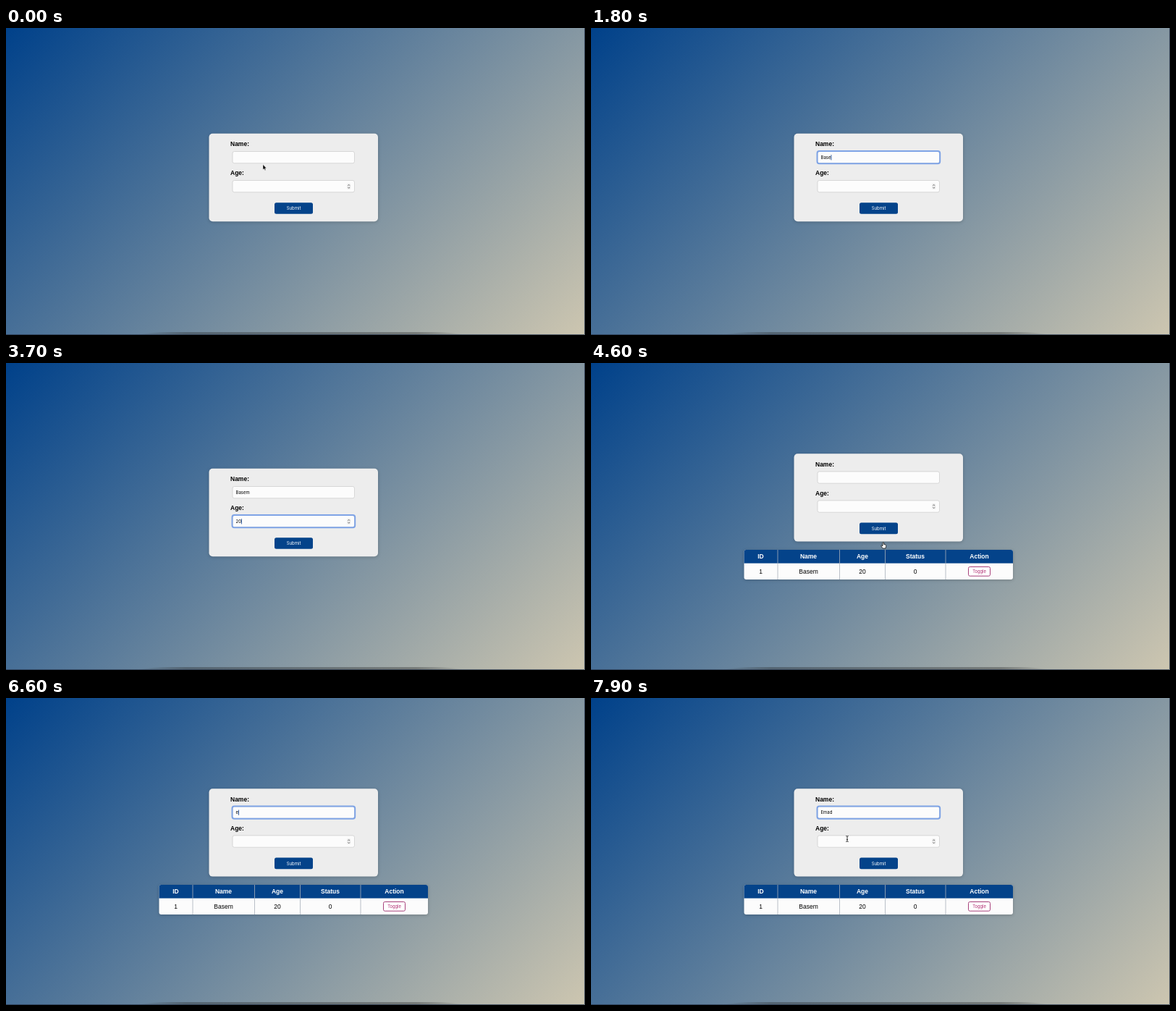
An HTML page that plays this animation: 800x424 px, repeating every 8000 ms.

```html
<!DOCTYPE html>
<html lang="en">
<head>
<meta charset="utf-8">
<title>Form and table</title>
<style>
html, body { margin: 0; width: 100%; height: 100%; overflow: hidden; }
body { background: linear-gradient(135deg, #00418a, #cdc6b0); }
svg { display: block; width: 800px; height: 424px; }
text { font: 8.5px "Liberation Sans", Arial, sans-serif; }
.bold { font-weight: bold; }
.ui { font: 6px Inter, sans-serif; }
.mid { text-anchor: middle; }
.field { fill: #fcfcfc; stroke: #cbcbcb; stroke-width: .7; }
.ring { fill: none; stroke: #7fa4e6; stroke-width: 2; }
.white { fill: #fff; }
#card, #table { filter: drop-shadow(0 1px 2px #0003); }
</style>
</head>
<body>
<svg viewBox="0 0 800 424">
  <defs>
    <linearGradient id="dock">
      <stop offset="0" stop-color="#222" stop-opacity="0"/>
      <stop offset=".15" stop-color="#222" stop-opacity=".35"/>
      <stop offset=".85" stop-color="#222" stop-opacity=".35"/>
      <stop offset="1" stop-color="#222" stop-opacity="0"/>
    </linearGradient>
    <clipPath id="round"><rect x="211.5" y="258" width="371.5" height="41" rx="3"/></clipPath>
  </defs>
  <path d="M180 424Q200 420 230 420H590Q615 420 635 424Z" fill="url(#dock)"/>
  <path d="M0 423.5H799.5V0" fill="none" stroke="#27364d" stroke-opacity=".75"/>

  <g id="form">
    <rect id="card" x="280.5" y="145.8" width="233.5" height="121.4" rx="5" fill="#ededed"/>
    <text class="bold" x="310" y="163.4">Name:</text>
    <text class="bold" x="310" y="203.4">Age:</text>
    <rect class="field" x="313" y="170.5" width="168.5" height="16.3" rx="2.5"/>
    <rect class="field" x="313" y="210.5" width="168.5" height="16.3" rx="2.5"/>
    <rect x="471.2" y="214.7" width="5" height="8" rx="1.5" fill="#ececec"/>
    <path d="M472.4 217.7l1.3-1.4 1.3 1.4M472.4 219.9l1.3 1.4 1.3-1.4" fill="none" stroke="#555" stroke-width=".8"/>
    <rect id="ring" class="ring" x="312.5" y="170" width="169.7" height="17.3" rx="3"/>
    <text id="name" class="ui" x="317.5" y="181.1"></text>
    <text id="age" class="ui" x="317.5" y="221.1"></text>
    <rect id="caret" width=".9" height="7.2" fill="#23519c"/>
    <rect id="submit" x="371" y="241.2" width="53" height="15.6" rx="2.5" fill="#04438a"/>
    <text class="ui mid white" x="397.5" y="251.4">Submit</text>
  </g>

  <g id="table">
    <g id="cells" clip-path="url(#round)">
      <rect x="211" y="258" width="373" height="41" fill="#fcfcfc"/>
      <rect x="211" y="258" width="373" height="18.6" fill="#04438a"/>
      <path d="M258 258v41M343.5 258v41M406.5 258v41M490 258v41" stroke="#a9b0ba" stroke-width=".8"/>
    </g>
    <rect x="521.5" y="281.5" width="30" height="12.7" rx="2" fill="#fff" stroke="#a8417c"/>
    <text class="ui mid" x="536.5" y="290" fill="#b02a70" style="font-size:5.8px">Toggle</text>
  </g>

  <g id="pointer">
    <path id="arrow" d="M0 0V7.3L1.7 5.8 2.8 8.3 4 7.8 2.9 5.3H5Z" fill="#000" stroke="#fff" stroke-width=".5"/>
    <path id="hand" d="M-1-4Q0-5 .7-4V-1.5L3-.9Q4-.5 3.8.7L3 4H-.8L-3.2.8Q-3.3-.4-2.2-.1L-1 .8Z" fill="#fff" stroke="#111" stroke-width=".8"/>
    <path id="beam" d="M-1.7-4Q0-4 0-3Q0-4 1.7-4M0-3V3M-1.7 4Q0 4 0 3Q0 4 1.7 4M-1 1H1" fill="none" stroke="#222" stroke-width=".9"/>
  </g>
</svg>
<script>
const $ = id => document.getElementById(id);
const LOOP = 8000, SUBMIT = 4500;

// Each step holds from its time until the next one.
const nameSteps = [[0, ""], [1200, "B"], [1400, "Ba"], [1600, "Bas"], [1800, "Base"], [1900, "Basem"],
  [SUBMIT, ""], [6500, "e"], [6800, ""], [7000, "E"], [7100, "Em"], [7200, "Ema"], [7300, "Emad"]];
const ageSteps = [[0, ""], [3300, "2"], [3500, "20"], [SUBMIT, ""]];
const focusSteps = [[0, ""], [700, "name"], [2700, "age"], [3900, ""], [5500, "name"]];
const shapeSteps = [[0, "arrow"], [300, "beam"], [1200, ""], [2100, "beam"], [3300, ""],
  [3900, "arrow"], [4200, "hand"], [4700, "arrow"], [5300, "beam"], [6500, ""], [7600, "beam"]];
const path = [[0, 355, 188.5], [100, 355, 188.5], [500, 347, 180], [2100, 347, 180], [2600, 345, 219],
  [3800, 345, 219], [4300, 404, 252], [4600, 404, 252], [5400, 347, 160.5], [7500, 347, 160.5], [7900, 354, 194.5]];

const at = (steps, t) => steps.findLast(s => s[0] <= t)[1];
const show = (id, on) => $(id).setAttribute("visibility", on ? "visible" : "hidden");
const move = (id, x, y) => $(id).setAttribute("transform", `translate(${x} ${y})`);

function pointerAt(t) {
  const i = path.findLastIndex(p => p[0] <= t);
  const a = path[i], b = path[i + 1] || a;
  const u = a === b ? 0 : (t - a[0]) / (b[0] - a[0]);
  const e = u * u * (3 - 2 * u);
  return [a[1] + (b[1] - a[1]) * e, a[2] + (b[2] - a[2]) * e];
}

function caretOn(t, focus) {
  if (!focus) return false;
  const edits = focus === "name" ? nameSteps : ageSteps;
  const start = Math.max(at(focusSteps.map(s => [s[0], s[0]]), t), at(edits.map(s => [s[0], s[0]]), t));
  return (t - start) % 1000 < 500;
}

function draw(now) {
  const t = Math.floor(now % LOOP / 100) * 100;
  const focus = at(focusSteps, t), shape = at(shapeSteps, t);
  const row = focus === "age" ? 40 : 0;
  $("name").textContent = at(nameSteps, t);
  $("age").textContent = at(ageSteps, t);

  show("ring", focus);
  move("ring", 0, row);
  show("caret", caretOn(t, focus));
  if (focus) move("caret", 317.5 + $(focus).getComputedTextLength(), 175.2 + row);

  move("form", 0, t >= SUBMIT ? -20.6 : 0);
  show("table", t >= SUBMIT);
  for (const id of ["arrow", "hand", "beam"]) show(id, id === shape);
  move("pointer", ...pointerAt(t));
}

// Fill the table's heading and single row.
const columns = [[234.5, "ID", "1"], [300.5, "Name", "Basem"], [375, "Age", "20"], [448, "Status", "0"], [536.5, "Action", ""]];
const cell = (x, y, label, cls) => `<text class="mid ${cls}" x="${x}" y="${y}">${label}</text>`;
$("cells").insertAdjacentHTML("beforeend", columns.map(([x, head, value]) =>
  cell(x, 270, head, "bold white") + cell(x, 290.6, value, "")).join(""));

const begin = performance.now();
function tick() {
  draw(performance.now() - begin);
  requestAnimationFrame(tick);
}
tick();
</script>
</body>
</html>
```
